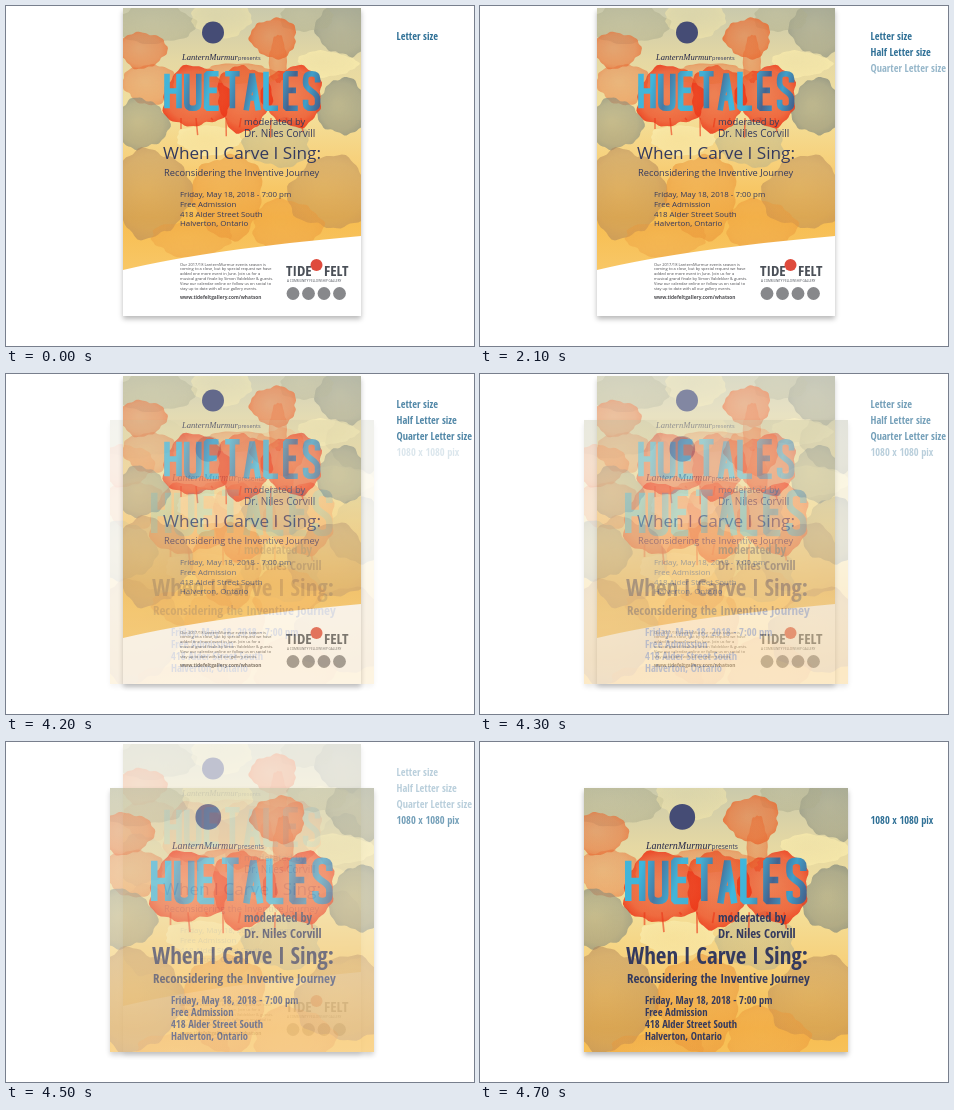
Animation of 468 by 340 pixels, one loop 8000 ms. Source, as an HTML page with a canvas:

```html
<!DOCTYPE html>
<html lang="en">
<head>
<meta charset="utf-8">
<title>Poster sizes</title>
<style>
  html, body { margin: 0; width: 100%; height: 100%; overflow: hidden; background: #fff; }
  canvas { display: block; }
</style>
</head>
<body>
<canvas id="stage" width="468" height="340" aria-label="HUETALES poster in several sizes"></canvas>
<script>
const W = 468, H = 340, LOOP = 8000;
const NAVY = '#343a5e', LABEL = '#2f7096';
const SANS = '"Open Sans", "Noto Sans", sans-serif';
const CONDENSED = '"Open Sans Condensed", ' + SANS;
const stage = document.getElementById('stage').getContext('2d');

function makeLayer(paint) {
  const canvas = document.createElement('canvas');
  canvas.width = W;
  canvas.height = H;
  paint(canvas.getContext('2d'));
  return canvas;
}

function text(c, str, x, y, size, { weight = 400, color = NAVY, family = SANS, style = '' } = {}) {
  c.font = `${style} ${weight} ${size}px ${family}`;
  c.fillStyle = color;
  c.fillText(str, x, y);
}

// Falls back to a general narrowing where no condensed face is available.
function condensed(c, str, x, y, size, weight = 700, color = NAVY) {
  const font = `${weight} ${size}px `;
  c.font = font + SANS;
  const regular = c.measureText(str).width;
  c.font = `condensed ${font}${CONDENSED}`;
  const narrow = c.measureText(str).width < regular * 0.93 ? 1 : 0.77;
  c.save();
  c.translate(x, y);
  c.scale(narrow, 1);
  c.fillStyle = color;
  c.fillText(str, 0, 0);
  c.restore();
}

function disc(c, x, y, r, color) {
  c.fillStyle = color;
  c.beginPath();
  c.arc(x, y, r, 0, Math.PI * 2);
  c.fill();
}

function linear(c, x0, y0, x1, y1, colors) {
  const g = c.createLinearGradient(x0, y0, x1, y1);
  colors.forEach((color, i) => g.addColorStop(i / (colors.length - 1), color));
  return g;
}

function sheet(c, x, y, w, h) {
  c.save();
  c.shadowColor = 'rgba(0,0,0,.28)';
  c.shadowBlur = 5;
  c.shadowOffsetY = 3;
  c.fillStyle = '#fff';
  c.fillRect(x, y, w, h);
  c.restore();
}

// A watercolour stain: uneven outline, pale centre, darker rim.
function stain(c, [x, y, rx, ry, rgb, alpha], seed) {
  c.save();
  c.translate(x, y);
  c.scale(rx, ry);
  c.beginPath();
  for (let i = 0; i < 72; i++) {
    const a = i / 72 * Math.PI * 2;
    const r = 1 + 0.07 * Math.sin(3 * a + seed) + 0.04 * Math.sin(7 * a + seed * 2.3)
      + 0.025 * Math.sin(15 * a + seed * 4.1);
    c.lineTo(r * Math.cos(a), r * Math.sin(a));
  }
  c.closePath();
  const g = c.createRadialGradient(-0.15, -0.1, 0.1, 0, 0, 1.08);
  g.addColorStop(0, `rgba(${rgb},${alpha * 0.65})`);
  g.addColorStop(0.75, `rgba(${rgb},${alpha * 0.8})`);
  g.addColorStop(1, `rgba(${rgb},${alpha})`);
  c.fillStyle = g;
  c.fill();
  c.restore();
}

const GREY = '133,139,125', OLIVE = '174,174,142', RED = '236,52,22',
      CORAL = '232,112,56', AMBER = '234,150,58', BROWN = '176,132,88', CREAM = '249,235,172';
const STAINS = [
  [150, 18, 38, 20, OLIVE, .6], [215, 14, 30, 18, CREAM, .5], [338, 22, 27, 28, GREY, .6],
  [300, 10, 26, 16, OLIVE, .6], [137, 44, 23, 18, CORAL, .75], [268, 32, 23, 20, CORAL, .9],
  [272, 54, 9, 24, CORAL, .7], [320, 58, 30, 13, CREAM, .8], [143, 78, 26, 20, CORAL, .55],
  [336, 101, 25, 28, GREY, .75], [136, 118, 26, 25, GREY, .65], [203, 134, 32, 15, CREAM, .8],
  [272, 137, 33, 24, OLIVE, .5], [190, 91, 34, 30, RED, .85], [238, 92, 27, 33, RED, .85],
  [287, 90, 30, 30, RED, .85], [231, 68, 42, 10, CORAL, .6],
  [146, 187, 38, 44, BROWN, .55], [222, 190, 35, 42, AMBER, .6], [324, 187, 41, 36, BROWN, .5],
  [280, 219, 35, 25, AMBER, .5], [186, 233, 40, 18, AMBER, .4]
];

function art(c) {
  c.fillStyle = linear(c, 0, 2, 0, 264, ['#c9c9ac', '#e5d8a3', '#f3e09c', '#f7cf78', '#f7bd50', '#f8c766']);
  c.fillRect(90, 0, 300, 280);
  c.save();
  c.filter = 'blur(.7px)';
  STAINS.forEach((s, i) => stain(c, s, i * 1.9 + 1));
  // Thin drips under the red wash.
  c.lineWidth = 1.5;
  c.strokeStyle = `rgba(${RED},.6)`;
  c.beginPath();
  for (let i = 0; i < 9; i++) {
    const x = 175 + i * 15;
    c.moveTo(x, 112);
    c.lineTo(x + Math.sin(i) * 2, 123 + 9 * Math.sin(i * 2.4));
  }
  c.stroke();
  c.restore();
}

const GLYPHS = {
  H: 'M0 0V1M1 0V1M0 .5H1',
  U: 'M0 0V.85Q0 1 .5 1Q1 1 1 .85V0',
  E: 'M1 0H0V1H1M0 .48H.85',
  T: 'M-.1 0H1.1M.5 0V1',
  A: 'M0 1.06L.5 0L1 1.06M.2 .7H.8',
  L: 'M0 -.06V1H1',
  S: 'M1 .25V.15Q1 0 .5 0Q0 0 0 .15V.27C0 .5 1 .5 1 .73V.85Q1 1 .5 1Q0 1 0 .85V.75'
};

function headline(c) {
  const lines = new Path2D();
  [...'HUETALES'].forEach((ch, i) =>
    lines.addPath(new Path2D(GLYPHS[ch]), { a: 12, d: 34.5, e: 161 + i * 19.8, f: 67.8 }));
  c.save();
  c.lineWidth = 5.6;
  c.lineJoin = 'bevel';
  c.strokeStyle = linear(c, 158, 66, 314, 104,
    ['#45b4d8', '#3eb6dc', '#4779a3', '#43b5d8', '#42aed4', '#48658f', '#3eb8df', '#43b0d4', '#45638e', '#3f9fca', '#465b86']);
  c.stroke(lines);
  c.restore();
}

function presenter(c, x, y, scale) {
  disc(c, x + 31 * scale, y - 27 * scale, 11 * scale, '#454c75');
  text(c, 'LanternMurmur', x, y, 8.6 * scale,
    { style: 'italic', color: '#25284a', family: '"Liberation Serif", serif' });
  text(c, 'presents', x + 56 * scale, y, 5.6 * scale);
}

const DETAILS = ['Friday, May 18, 2018 - 7:00 pm', 'Free Admission', '418 Alder Street South', 'Halverton, Ontario'];
const NOTE = [
  'Our 2017/18 LanternMurmur events season is',
  'coming to a close, but by special request we have',
  'added one more event in June. Join us for a',
  'musical grand finale by Simon Valdekker & guests.',
  'View our calendar online or follow us on social to',
  'stay up to date with all our gallery events.'
];

function footer(c) {
  c.fillStyle = '#fff';
  c.beginPath();
  c.moveTo(117, 264);
  c.quadraticCurveTo(205, 243, 355, 230);
  c.lineTo(355, 310);
  c.lineTo(117, 310);
  c.fill();
  NOTE.forEach((line, i) => text(c, line, 174, 259.5 + i * 4.95, 4, { color: '#4c4c50' }));
  text(c, 'www.tidefeltgallery.com/whatson', 174, 293, 4.8, { weight: 700, color: '#4c4c50' });
  condensed(c, 'TIDE', 280, 270, 15, 400, '#4b5058');
  condensed(c, 'FELT', 318, 270, 15, 400, '#4b5058');
  disc(c, 310.5, 259, 6, '#df4b3d');
  text(c, 'A COMMUNITY FELLOWSHIP GALLERY', 281, 276, 3.1, { color: '#4b5058' });
  for (let i = 0; i < 4; i++) disc(c, 287 + i * 15.5, 287.5, 6.4, '#87888b');
}

const letter = makeLayer(c => {
  sheet(c, 117, 2, 238, 308);
  c.beginPath();
  c.rect(117, 2, 238, 308);
  c.clip();
  art(c);
  footer(c);
  headline(c);
  presenter(c, 176, 53.5, 1);
  text(c, 'moderated by', 238, 118.5, 9.4);
  text(c, 'Dr. Niles Corvill', 238, 131, 10);
  text(c, 'When I Carve I Sing:', 157, 152.5, 17.2);
  text(c, 'Reconsidering the Inventive Journey', 158, 169.5, 9.3);
  DETAILS.forEach((line, i) => text(c, line, 174, 191.3 + i * 9.7, 7.9));
});

const square = makeLayer(c => {
  sheet(c, 104, 46, 264, 264);
  c.beginPath();
  c.rect(104, 46, 264, 264);
  c.clip();
  c.save();
  c.transform(1.163, 0, 0, 1.163, -39, 40);
  art(c);
  headline(c);
  c.restore();
  presenter(c, 166, 106.5, 1.17);
  condensed(c, 'moderated by', 238, 180, 12.4);
  condensed(c, 'Dr. Niles Corvill', 238, 195.5, 12.8);
  condensed(c, 'When I Carve I Sing:', 146, 222, 23);
  condensed(c, 'Reconsidering the Inventive Journey', 147, 241, 12.9);
  DETAILS.forEach((line, i) => condensed(c, line, 165, 261.5 + i * 12.2, 10.5));
});

const labels = ['Letter size', 'Half Letter size', 'Quarter Letter size', '1080 x 1080 pix']
  .map((str, i) => makeLayer(c => condensed(c, str, 390.5, 33.8 + i * 16, 10.4, 400, LABEL)));

// Progress in equal 100 ms jumps; the first jump lands at the start time.
const stepped = (t, start, steps) =>
  Math.max(0, Math.min(1, (Math.floor((t - start) / 100) + 1) / steps));

function show(layer, alpha) {
  if (alpha <= 0) return;
  stage.globalAlpha = alpha;
  stage.drawImage(layer, 0, 0);
}

function frame(now) {
  const t = now % LOOP;
  const fade = stepped(t, 4200, 6);
  stage.globalAlpha = 1;
  stage.fillStyle = '#fff';
  stage.fillRect(0, 0, W, H);
  show(letter, 1 - fade);
  show(square, fade);
  show(labels[0], 1 - fade);
  show(labels[1], stepped(t, 1000, 2) * (1 - fade));
  show(labels[2], stepped(t, 2100, 2) * (1 - fade));
  show(labels[3], fade);
  requestAnimationFrame(frame);
}
frame(performance.now());
</script>
</body>
</html>
```
